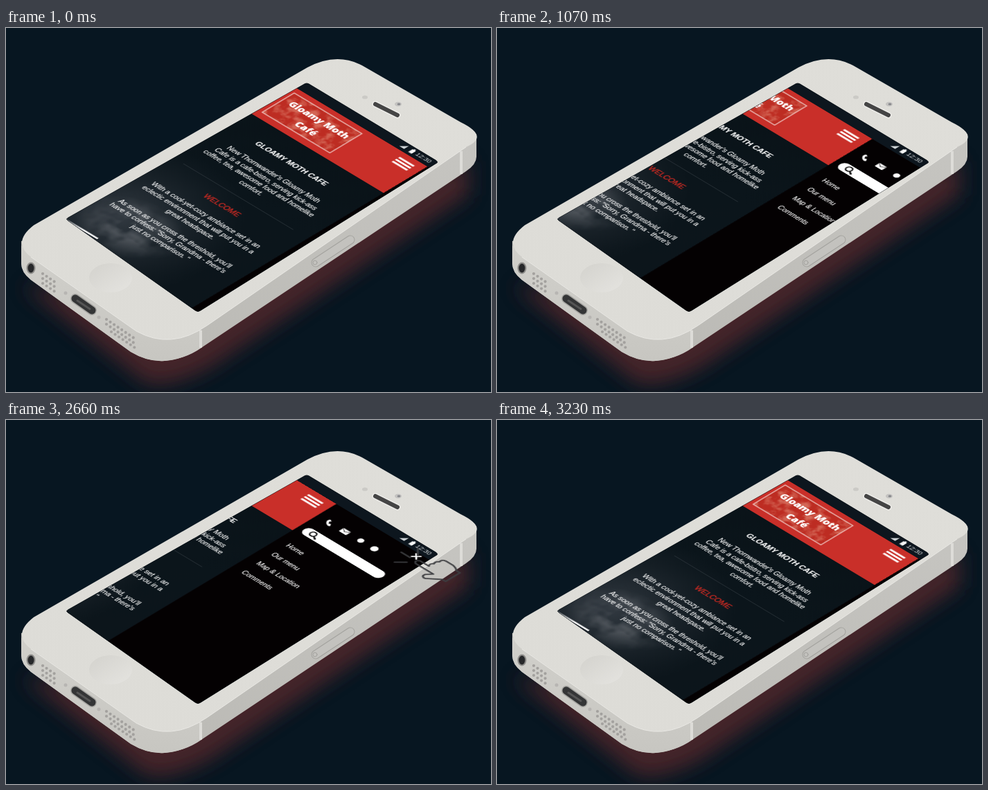
These frames come from a looping animation (700x526 px, 4.1 s). An HTML page:

```html
<!DOCTYPE html>
<html lang="en">
<head>
<meta charset="utf-8">
<title>Cafe app menu</title>
<style>
  html, body { margin: 0; width: 100%; height: 100%; overflow: hidden; background: #071621; }
  svg { display: block; width: 100vw; height: 100vh; }
  text { font-family: "Liberation Sans", Arial, sans-serif; font-size: 10.2px; fill: #fff; stroke: #fff; stroke-width: .15px; }
  .copy text { text-anchor: middle; }
  .copy .title { font-size: 11.2px; font-weight: bold; }
  .copy .accent { font-size: 11.2px; fill: #c92a23; stroke: #c92a23; stroke-width: .4px; }
  .copy .logo { font: 800 14px "Open Sans", "Noto Sans", sans-serif; }
  .menu text { font-size: 10px; }
  .clock { font-size: 9.5px; fill: #d6dadd; stroke: none; }

  .slide { animation: slide 4100ms infinite; }
  .hand { opacity: 0; fill: none; stroke: #3b3c3f; stroke-width: 2.6; stroke-linecap: round; stroke-linejoin: round; }
  .open { animation: tap-open 4100ms linear infinite; }
  .close { animation: tap-close 4100ms linear infinite; }

  @keyframes slide {
    0%, 23.66% { transform: translateX(0); animation-timing-function: ease; }
    31.95%, 67.07% { transform: translateX(-153.5px); animation-timing-function: ease; }
    78.78%, 100% { transform: translateX(0); }
  }
  @keyframes tap-open {
    0%, 11.44% { opacity: 0; }
    11.46% { opacity: .13; }
    16.34%, 23.17% { opacity: .95; }
    26.1%, 100% { opacity: 0; }
  }
  @keyframes tap-close {
    0%, 55.34% { opacity: 0; }
    55.37% { opacity: .13; }
    60.24%, 67.07% { opacity: .95; }
    70.4%, 100% { opacity: 0; }
  }
</style>
</head>
<body>
<svg viewBox="0 0 700 526" preserveAspectRatio="none">
  <defs>
    <linearGradient id="face" x1="1" y1="0" x2="0" y2="1">
      <stop offset="0" stop-color="#dfded9"/><stop offset="1" stop-color="#dddcd7"/>
    </linearGradient>
    <linearGradient id="wall" x1="0" y1="1" x2="1" y2="0">
      <stop offset="0" stop-color="#b9b8b3"/><stop offset="1" stop-color="#c6c5c1"/>
    </linearGradient>
    <linearGradient id="front" x1=".5" y1="0" x2=".3" y2="1">
      <stop offset="0" stop-color="#d2d1cc"/><stop offset="1" stop-color="#c6c5c0"/>
    </linearGradient>
    <linearGradient id="button" x1="0" y1="0" x2="1" y2="1">
      <stop offset="0" stop-color="#d3d2cd"/><stop offset="1" stop-color="#e5e4e0"/>
    </linearGradient>
    <linearGradient id="page" x1="0" y1="0" x2="0" y2="1">
      <stop offset="0" stop-color="#091217"/><stop offset=".5" stop-color="#0b151b"/><stop offset="1" stop-color="#0c151b"/>
    </linearGradient>
    <linearGradient id="streak">
      <stop offset="0" stop-color="#fff" stop-opacity=".25"/><stop offset=".6" stop-color="#fff"/>
    </linearGradient>
    <radialGradient id="haze">
      <stop offset="0" stop-color="#5a5f68" stop-opacity=".5"/><stop offset="1" stop-color="#3a4048" stop-opacity="0"/>
    </radialGradient>
    <radialGradient id="smoke">
      <stop offset="0" stop-color="#8d9095" stop-opacity=".75"/><stop offset="1" stop-color="#666a70" stop-opacity="0"/>
    </radialGradient>
    <filter id="blur" x="-20%" y="-20%" width="140%" height="140%"><feGaussianBlur stdDeviation="14"/></filter>
    <filter id="mottle" x="0" y="0" width="100%" height="100%">
      <feTurbulence type="fractalNoise" baseFrequency=".09" numOctaves="3" seed="4"/>
      <feColorMatrix values="0 0 0 0 .86  0 0 0 0 .42  0 0 0 0 .3  3 0 0 0 -1.25"/>
      <feComposite operator="in" in2="SourceGraphic"/>
    </filter>
    <filter id="wisps" x="0" y="0" width="100%" height="100%">
      <feTurbulence type="fractalNoise" baseFrequency=".03" numOctaves="3" seed="9" result="noise"/>
      <feColorMatrix values="0 0 0 0 1  0 0 0 0 1  0 0 0 0 1  3 0 0 0 -.9" result="mask"/>
      <feComposite operator="in" in="SourceGraphic" in2="mask"/>
    </filter>
    <clipPath id="screen"><path id="glass" d="M429 82 Q434 78 439 82 L620 191 Q625 194 620 196 L281 408 Q277 411 273 408 L89 278 Q86 276 90 274Z"/></clipPath>
    <!-- pointing hand, fingertip at the origin, lying on the screen plane and aiming left -->
    <g id="pointer" transform="matrix(.8 -.48 .8 .48 0 0)">
      <path d="M-4 3 Q0 -4 4 3 V19 Q9 15 12 20 Q17 17 20 22 Q26 20 27 27 V40 Q26 46 22 51 V57 H-4 V51 L-18 34 Q-19 27 -12 28 L-4 35Z"/>
      <path d="M0 -11 V-27 M-10 -7 L-21 -18 M10 -7 L21 -18"/>
    </g>
  </defs>

  <rect width="700" height="526" fill="#071621"/>
  <path d="M24 372 L200 512 Q232 524 296 490 L668 240 L668 190 L230 400Z" fill="#50252c" opacity=".85" filter="url(#blur)"/>

  <!-- phone body -->
  <path d="M22 308 V340 Q22 353 36 364 L180 468 Q228 497 282 462 L664 207 Q679 197 679 186 V153 L400 200Z" fill="url(#wall)"/>
  <path d="M22 314 V340 Q22 353 36 364 L180 468 Q205 483 229 481 Q260 478 282 462 V430 L188 438 L36 331Z" fill="url(#front)"/>
  <path d="M40 285 L435 57 Q480 33 519 57 L656 136 Q699 157 664 172 L290 430 Q238 466 188 438 L36 331 Q8 310 40 285Z" fill="url(#face)"/>
  <path d="M36 331 L188 438 Q238 466 290 430 L664 172" fill="none" stroke="#e9e8e4"/>
  <path d="M281 437 V462 M657 178 V211" stroke="#dddcd8" stroke-width="4"/>
  <g fill="none" stroke="#a3a29e" stroke-linecap="round">
    <path d="M447 339 L497 306" stroke-width="13"/>
    <path d="M447 339 L497 306" stroke="#c3c2be" stroke-width="11"/>
    <circle cx="446" cy="339" r="3"/>
  </g>
  <ellipse cx="36" cy="347" rx="6.5" ry="8.5" fill="#8e8d8a"/>
  <ellipse cx="36" cy="347" rx="4.5" ry="6.5" fill="#27282a"/>
  <g fill="none" stroke-linecap="round">
    <path d="M53 355 l22 15 M53 362 l22 15 M53 369 l22 15 M145 421 l41 28 M145 428 l41 28 M152 439 l34 23" stroke="#a3a19e" stroke-width="4.2" stroke-dasharray="0 6.7"/>
    <path d="M100 391 L124 408" stroke="#a6a5a1" stroke-width="14"/>
    <path d="M100 391 L124 408" stroke="#343536" stroke-width="11"/>
    <path d="M103 394 L121 406" stroke="#555" stroke-width="3"/>
    <path d="M86 383 h0 M134 418 h0" stroke="#b7b5b2" stroke-width="5"/>
    <path d="M533 110 L565 126" stroke="#efeeeb" stroke-width="9"/>
    <path d="M533 110 L565 126" stroke="#454545" stroke-width="6"/>
  </g>
  <ellipse cx="566" cy="110" rx="5" ry="3.3" fill="#c3c2c0"/>
  <ellipse cx="567" cy="110" rx="2.3" ry="1.6" fill="#85868a"/>
  <ellipse cx="518" cy="100" rx="4" ry="2.6" fill="#cbcac6"/>
  <ellipse cx="151" cy="361" rx="31" ry="21" fill="url(#button)"/>

  <!-- screen -->
  <use href="#glass" fill="#0a1118" stroke="#10161b"/>
  <g clip-path="url(#screen)">
    <g transform="matrix(.857 .515 -.857 .515 434 79)">
      <g class="slide">
        <rect x="-40" y="16" width="260" height="400" fill="url(#page)"/>
        <ellipse cx="30" cy="345" rx="150" ry="150" fill="url(#haze)"/>
        <ellipse cx="55" cy="352" rx="75" ry="55" fill="url(#smoke)" filter="url(#wisps)"/>
        <rect x="-14" y="393.5" width="57" height="2.6" fill="url(#streak)"/>
        <rect x="-40" y="16" width="260" height="74" fill="#c92f29"/>
        <rect x="4" y="25" width="114" height="54" fill="#bd2c22"/>
        <rect x="4" y="25" width="114" height="54" filter="url(#mottle)" opacity=".45"/>
        <rect x="4" y="25" width="114" height="54" fill="none" stroke="#f6dcd8" stroke-width="1.2"/>
        <path d="M182.5 27 h25 m-25 5.5 h25 m-25 5.5 h25" stroke="#fff" stroke-width="3"/>
        <path d="M10 217.5 H195" stroke="#39434a" stroke-width=".8" opacity=".7"/>
        <g class="copy">
          <text class="logo" x="63" y="47">Gloamy Moth</text>
          <text class="logo" x="64" y="70">Café</text>
          <text class="title" x="101" y="130.5">GLOAMY MOTH CAFE</text>
          <text x="101" y="160">New Thornwander's Gloamy Moth</text>
          <text x="101" y="172.7">Cafe is a cafe-bistro, serving kick-ass</text>
          <text x="101" y="185.3">coffee, tea, awesome food and homelike</text>
          <text x="101" y="198">comfort.</text>
          <text class="accent" x="101" y="247">WELCOME</text>
          <text x="101" y="274.5">With a cool-yet-cozy ambiance set in an</text>
          <text x="101" y="287.2">eclectic environment that will put you in a</text>
          <text x="101" y="299.9">great headspace.</text>
          <text x="101" y="325.6">As soon as you cross the threshold, you'll</text>
          <text x="101" y="338.3">have to confess: "Sorry, Grandma - there's</text>
          <text x="101" y="351">just no comparison. "</text>
        </g>

        <g class="menu" transform="translate(153.5)">
          <rect x="66" y="16" width="330" height="410" fill="#040102"/>
          <g fill="#fff">
            <path d="M83 43 q-3 4 1 8 q4 4 8 2 l-2 -4 l-3 1 q-2 -2 -2 -4 l2 -1z"/>
            <rect x="106" y="43.5" width="12" height="8.5" rx="1"/>
            <circle cx="138" cy="47" r="4.3"/>
            <circle cx="161" cy="47" r="5"/>
            <rect x="74.5" y="71" width="133" height="16" rx="8"/>
          </g>
          <path d="M106.5 44.5 l5.5 4 l5.5 -4" fill="none" stroke="#040102"/>
          <path d="M202.5 18 l9 9 m0 -9 l-9 9" stroke="#fff" stroke-width="2.4"/>
          <g fill="none" stroke="#111" stroke-width="1.9">
            <circle cx="89" cy="78" r="4.2"/>
            <path d="M92.5 80.5 l5.5 3.5" stroke-width="2.5"/>
          </g>
          <text x="82" y="118.5">Home</text>
          <text x="82" y="143.5">Our menu</text>
          <text x="82" y="168.5">Map &amp; Location</text>
          <text x="82" y="193.5">Comments</text>
        </g>
      </g>

      <!-- status bar -->
      <rect x="-20" y="-6" width="270" height="22" fill="#0d161e"/>
      <path d="M167 11 h8 v-8z" fill="#cdd2d5"/>
      <path d="M182.5 4 h1.5 v-1.5 h2.5 v1.5 h1.5 v7.5 h-5.5z" fill="#f4f5f5"/>
      <text class="clock" x="192" y="10.5">12:30</text>
    </g>
  </g>

  <g class="hand open"><use href="#pointer" x="572" y="207"/></g>
  <g class="hand close"><use href="#pointer" x="592" y="204"/></g>
</svg>
</body>
</html>
```
